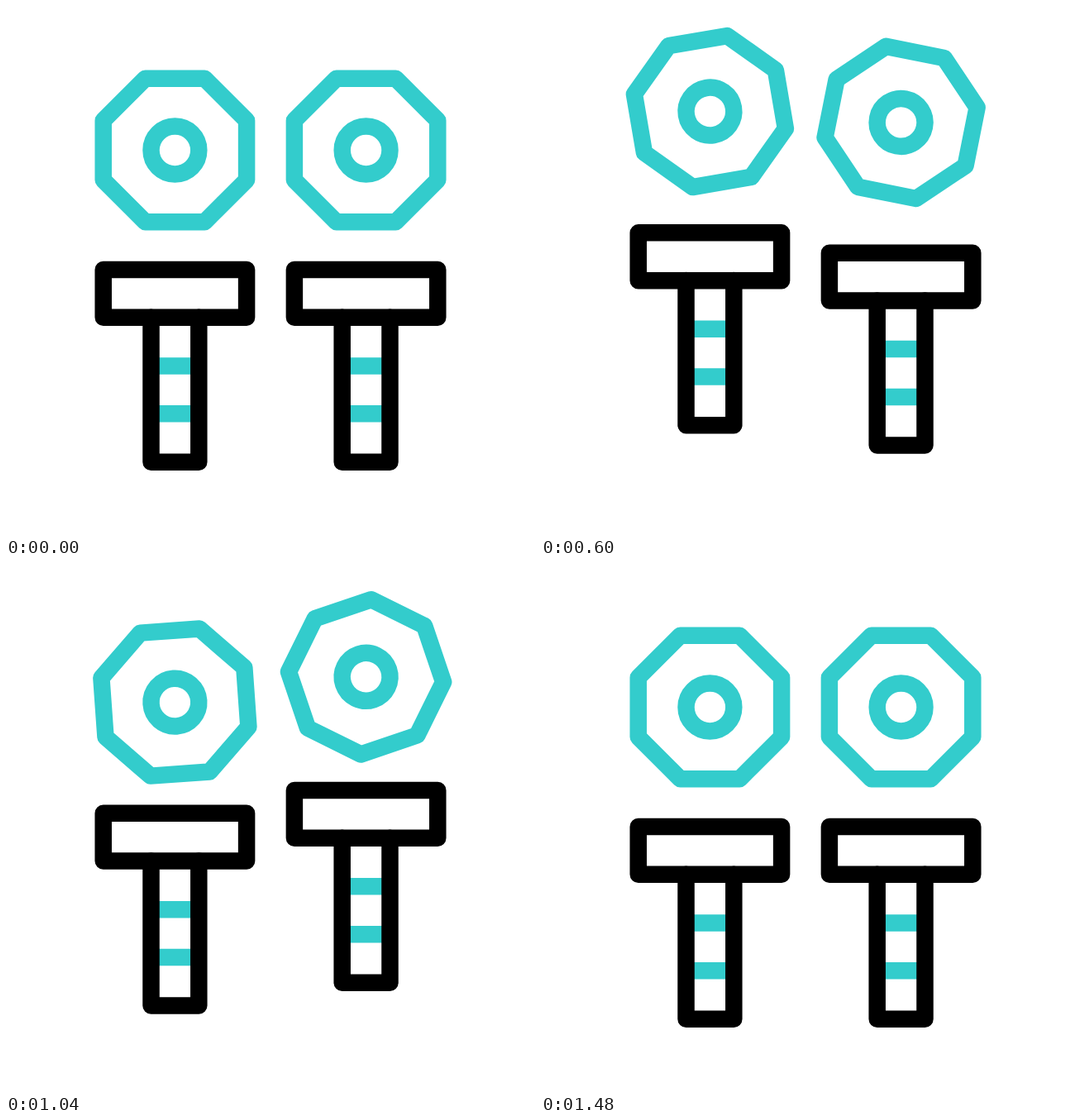
An HTML page that plays this animation: 640 by 640 pixels, repeating every 1600 ms.

```html
<!DOCTYPE html>
<html lang="en">
<head>
<meta charset="utf-8">
<title>Nuts and bolts</title>
<style>
  html, body { margin: 0; width: 100%; height: 100%; overflow: hidden; background: #fff; }
  svg { display: block; width: 100vw; height: 100vh; }
  .line { fill: none; stroke-width: 20.5; stroke-linejoin: round; }
  .teal { stroke: #33cccc; }
  .black { stroke: #000; }
</style>
</head>
<body>
<svg id="stage" viewBox="0 0 640 640"></svg>
<script>
const LOOP = 1600;
const LIFT = 47.2;
const UNIT = 28.9;
const NUT_Y = 174.5;
const stage = document.getElementById('stage');

function add(parent, tag, attrs) {
  const el = document.createElementNS('http://www.w3.org/2000/svg', tag);
  for (const key in attrs) el.setAttribute(key, attrs[key]);
  parent.appendChild(el);
  return el;
}

// Each part is drawn around x = 0
function makeNut() {
  const g = add(stage, 'g', {});
  const radius = 3 * UNIT / Math.cos(Math.PI / 8);
  const points = Array.from({ length: 8 }, (_, i) => {
    const a = (i + 0.5) * Math.PI / 4;
    return [radius * Math.cos(a), radius * Math.sin(a)].map(v => v.toFixed(2)).join();
  });
  add(g, 'polygon', { class: 'line teal', points: points.join(' ') });
  add(g, 'circle', { class: 'line teal', r: UNIT });
  return g;
}

function makeBolt() {
  const g = add(stage, 'g', {});
  for (const y of [435.4, 493.2]) {
    add(g, 'path', { class: 'line teal', d: `M${-UNIT} ${y}H${UNIT}` });
  }
  add(g, 'path', {
    class: 'line black', 'stroke-linecap': 'round',
    d: `M${-UNIT} 376.7V551.8H${UNIT}V376.7`
  });
  add(g, 'rect', {
    class: 'line black', x: -3 * UNIT, y: 319, width: 6 * UNIT, height: 2 * UNIT
  });
  return g;
}

// Cubic bezier (.55, 0, .45, 1), solved by bisection
function ease(u) {
  if (u <= 0) return 0;
  if (u >= 1) return 1;
  let lo = 0, hi = 1;
  for (let i = 0; i < 30; i++) {
    const s = (lo + hi) / 2, r = 1 - s;
    const x = 1.65 * s * r * r + 1.35 * s * s * r + s * s * s;
    if (x < u) lo = s; else hi = s;
  }
  return lo * lo * (3 - 2 * lo);
}

const tween = (t, from, to) => ease((t - from) / (to - from));
const rise = t => LIFT * (tween(t, 40, 640) - tween(t, 640, 1200));
const spin = t => 90 * tween(t, 60, 1260);

const pairs = [
  { x: 204.4, delay: 0 },
  { x: 435.6, delay: 200 }
].map(p => ({ ...p, nut: makeNut(), bolt: makeBolt() }));

function render(t) {
  for (const { x, delay, nut, bolt } of pairs) {
    const local = t - delay;
    nut.setAttribute('transform',
      `translate(${x} ${NUT_Y - rise(local)}) rotate(${spin(local)})`);
    bolt.setAttribute('transform', `translate(${x} ${-rise(local - 80)})`);
  }
}

function tick(now) {
  render(now % LOOP);
  requestAnimationFrame(tick);
}

render(0);
requestAnimationFrame(tick);
</script>
</body>
</html>
```
